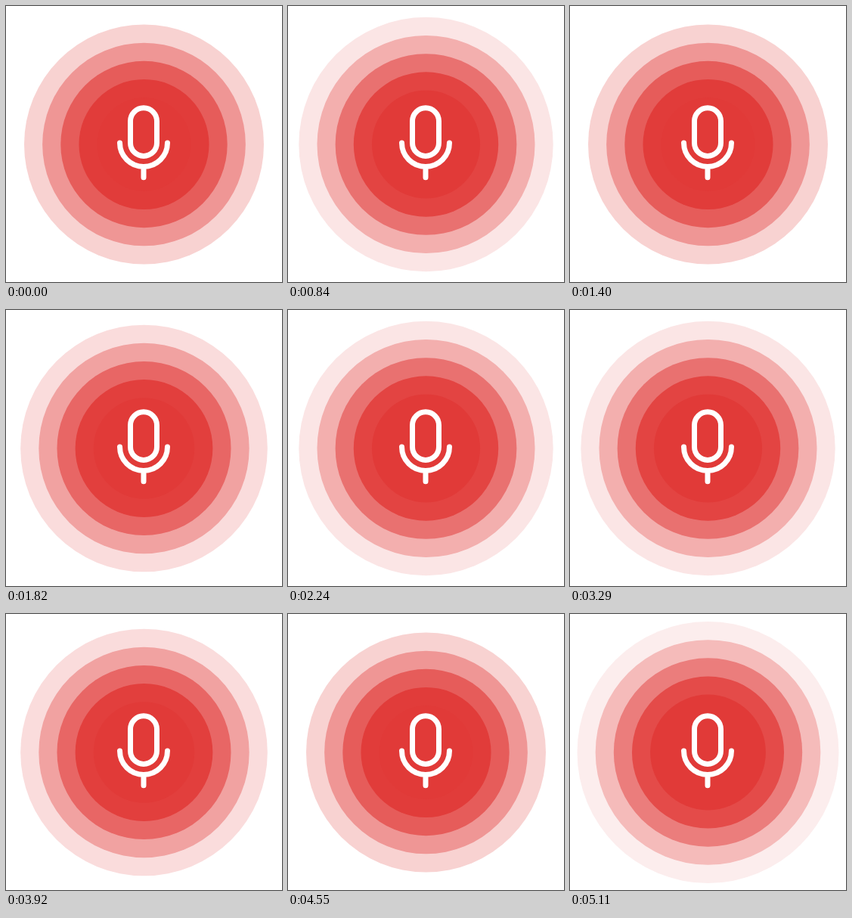
Animation, 365 px wide and 365 px high, one loop 5180 ms. Source, as an HTML page:

```html
<!DOCTYPE html>
<html lang="en">
<head>
<meta charset="utf-8">
<title>Microphone pulse</title>
<style>
  html, body { margin: 0; width: 100%; height: 100%; overflow: hidden; background: #fff; }
  svg { display: block; width: 100%; height: 100%; }
</style>
</head>
<body>
<svg viewBox="0 0 365 365">
  <g id="rings"></g>
  <g fill="none" stroke="#fff" stroke-width="7" stroke-linecap="round">
    <rect x="164.5" y="134.8" width="35" height="63.6" rx="17.5"/>
    <path d="M150.5 180.9a31.5 31.5 0 0 0 63 0M182 212.4v14.4"/>
  </g>
</svg>
<script>
const LOOP = 5180, STEP = 70, STEPS = 5;
const CORE = 61.9, GAP = 24.15, EDGE = 175, COUNT = 6;
const FADE_START = 80, FADE_END = 194;
const RED = [225, 58, 56];

const smoothstep = (a, b, x) => {
  const u = Math.min(Math.max((x - a) / (b - a), 0), 1);
  return u * u * (3 - 2 * u);
};

// Rings blend from red to white as they grow.
function colorAt(radius) {
  const fade = smoothstep(FADE_START, FADE_END, radius);
  return `rgb(${RED.map(c => Math.round(c + (255 - c) * fade)).join()})`;
}

const group = document.getElementById('rings');
const rings = Array.from({ length: COUNT }, () => {
  const ring = document.createElementNS('http://www.w3.org/2000/svg', 'circle');
  ring.setAttribute('cx', 182.5);
  ring.setAttribute('cy', 183);
  group.prepend(ring);
  return ring;
});

function render(ms) {
  const phase = Math.floor((ms % LOOP) / STEP) % STEPS / STEPS;
  rings.forEach((ring, i) => {
    const radius = CORE + GAP * (i + phase);
    ring.setAttribute('r', radius < EDGE ? radius : 0);
    ring.setAttribute('fill', colorAt(radius));
  });
}

const start = performance.now();
function tick() {
  render(performance.now() - start);
  requestAnimationFrame(tick);
}
tick();
</script>
</body>
</html>
```
